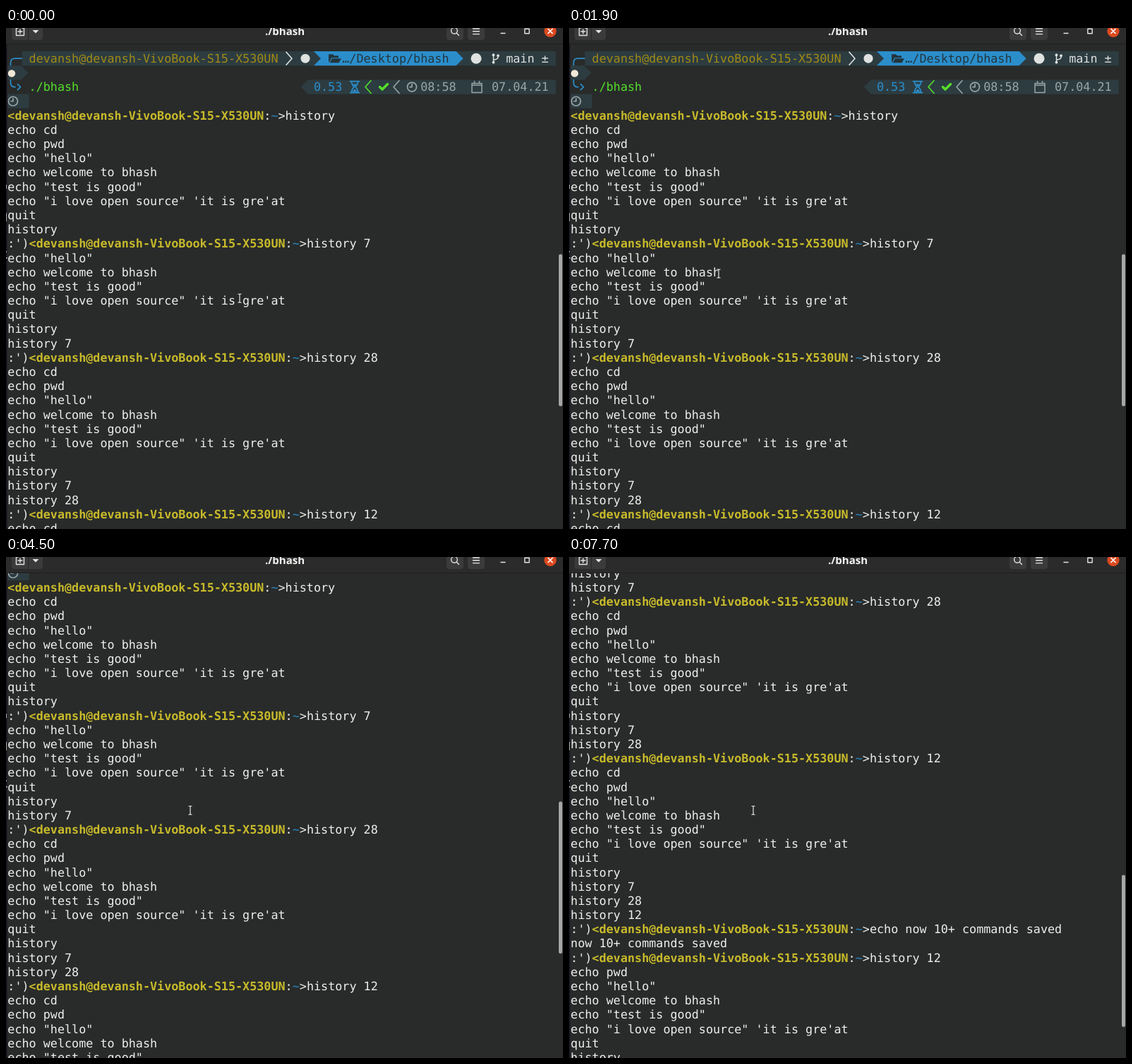
An HTML page that plays this animation: 789 by 710 pixels, repeating every 8 s.

```html
<!DOCTYPE html>
<html lang="en">
<head>
<meta charset="utf-8">
<title>Terminal history</title>
<style>
  html, body { margin: 0; width: 100%; height: 100%; overflow: hidden; background: #282b2a; }
  svg { display: block; width: 789px; height: 710px; }
  text { white-space: pre; text-rendering: geometricPrecision; }
  #rows text { font: 16.75px "DejaVu Sans Mono", "Liberation Mono", monospace; fill: #eeeeec; }
  #rows .user { font-weight: bold; fill: #c8ba2b; }
  #rows .tilde { fill: #2b86c6; }
  .line { fill: none; stroke-width: 1.7; stroke-linecap: round; stroke-linejoin: round; }
  .title { font: bold 15px "Noto Sans", "Open Sans", sans-serif; fill: #f2f2f0; }
</style>
</head>
<body>
<svg viewBox="0 0 789 710" xmlns="http://www.w3.org/2000/svg">
  <defs><clipPath id="view"><rect x="2" y="23" width="787" height="687"/></clipPath></defs>
  <rect width="789" height="710" fill="#282b2a"/>
  <g clip-path="url(#view)"><g id="rows"></g></g>

  <!-- sliver of the window behind -->
  <rect y="23" width="1.5" height="687" fill="#191420"/>
  <path d="M0 222h1v6h-1zM0 262h1v12h-1zM0 316h1v2h-1zM0 325h2v1.5h-2z" fill="#a9a9a9"/>

  <rect id="thumb" x="783" y="320.5" width="5" height="215.5" rx="2.5" fill="#a6a8a6"/>

  <g id="bar">
    <rect width="789" height="23" fill="#2b2b2b"/>
    <rect y="22" width="789" height="1" fill="#1f1f1f"/>
    <g fill="#3b3b3b">
      <rect x="8" y="-8" width="44" height="25" rx="4"/>
      <rect x="624" y="-8" width="24" height="25" rx="4"/>
      <rect x="654" y="-8" width="24" height="25" rx="4"/>
    </g>
    <path d="M31.5 0V17" stroke="#272727"/>
    <g class="line" stroke="#e4e4e2" style="stroke-width:1.4">
      <path d="M17 0H14.5V10.5H25.5V0H23M20 2V8M17 5H23"/>
      <circle cx="635" cy="3.8" r="4.4"/>
      <path d="M638.3 7.2L641.5 10.5M661.5 1H670.5M661.5 4.8H670.5M661.5 8.6H670.5"/>
      <path d="M701 7.5H707M734.8 1.2H741.2V7.8H734.8Z"/>
    </g>
    <path d="M37.5 3H46.5L42 7.5Z" fill="#e4e4e2"/>
    <circle cx="771" cy="4.5" r="8.6" fill="#db4a20"/>
    <path class="line" d="M768 1.5L774 7.5M774 1.5L768 7.5" stroke="#fff"/>
    <text class="title" x="395" y="10" text-anchor="middle">./bhash</text>
  </g>

  <g id="pointer" class="line">
    <path d="M-2.3 -6H-.8L0 -5.3L.8 -6H2.3M0 -5.3V5.3M-2.3 6H-.8L0 5.3L.8 6H2.3" stroke="#1b1c1c" stroke-width="2.4"/>
    <path d="M-2.3 -6H-.8L0 -5.3L.8 -6H2.3M0 -5.3V5.3M-2.3 6H-.8L0 5.3L.8 6H2.3" stroke="#f0f0f0" stroke-width="1.2"/>
  </g>
</svg>
<script>
const LOOP = 8000, PITCH = 20.18, CELL = 10.084, LEFT = 2.3, TOP = 43.2;
const USER = 'devansh@devansh-VivoBook-S15-X530UN';
const SLATE = '#2d3c41', BLUE = '#2b8ecb', GREY = '#9aa5a6', GREEN = '#55e02a', PALE = '#dfe2e0';
const $ = id => document.getElementById(id);
const rows = $('rows');

const col = n => LEFT + n * CELL;
const mid = n => TOP + n * PITCH;

function add(tag, attrs, parent = rows) {
  const el = document.createElementNS('http://www.w3.org/2000/svg', tag);
  for (const k in attrs) el.setAttribute(k, attrs[k]);
  parent.append(el);
  return el;
}
function write(row, c, parts, fill) {
  const el = add('text', { x: col(c), y: mid(row) + 5.8 });
  if (fill) el.style.fill = fill;
  for (const [str, cls] of parts) add('tspan', cls ? { class: cls } : {}, el).textContent = str;
}
const label = (row, c, str, fill) => write(row, c, [[str]], fill);
const stroke = (d, color, width = 1.7) =>
  add('path', { d, class: 'line', stroke: color, style: `stroke-width:${width}` });
const shape = (d, fill) => add('path', { d, fill });
const dot = (cx, cy, r, fill) => add('circle', { cx, cy, r, fill });

// Band from column a to b; head adds a pointed end: 1 right, -1 left.
function band(row, a, b, fill, head = 0) {
  const y = mid(row), t = y - PITCH / 2, e = y + PITCH / 2, l = col(a), r = col(b);
  const right = head > 0 ? `L${r + CELL} ${y}` : '';
  const left = head < 0 ? `L${l - CELL} ${y}` : '';
  shape(`M${l} ${t}H${r}${right}L${r} ${e}H${l}${left}Z`, fill);
}
function chevron(row, x, dir, color) {
  const y = mid(row);
  stroke(`M${x - 4 * dir} ${y - 9}L${x + 4 * dir} ${y}L${x - 4 * dir} ${y + 9}`, color, 1.6);
}
function clock(x, y) {
  stroke(`M${x - 6.5} ${y}a6.5 6.5 0 1 1 13 0a6.5 6.5 0 1 1 -13 0M${x} ${y - 4}V${y}H${x - 3}`, GREY);
}

function drawStatus() {
  const y0 = mid(0), y2 = mid(2);
  band(0, 2, 77, SLATE);
  band(0, 43, 63, BLUE, 1);
  band(0, 42, 43, SLATE, 1);
  stroke(`M6.5 ${y0 + 10}V${y0 + 6}Q6.5 ${y0} 12.5 ${y0}H22`, BLUE);
  label(0, 3, USER, '#a18b14');
  chevron(0, 401, 1, PALE);
  dot(424, y0, 6.5, PALE);
  shape(`M457 ${y0 + 5}V${y0 - 6}H463L465 ${y0 - 4}H471V${y0 - 1}H461L458 ${y0 + 5}ZM458.5 ${y0 + 6}L462 ${y0}H475L471.5 ${y0 + 6}Z`, '#23353d');
  label(0, 47, '…/Desktop/bhash', '#23353d');
  dot(666, y0, 7.5, PALE);
  stroke(`M690.5 ${y0 - 4}V${y0 + 4}M690.5 ${y0 + 2}Q697 ${y0 + 1} 697 ${y0 - 2}`, PALE, 1.5);
  for (const [x, y] of [[690.5, -5], [690.5, 5.5], [697, -4]]) dot(x, y0 + y, 1.9, PALE);
  label(0, 70, 'main ±', PALE);

  band(1, 0, 1.9, SLATE, 1);
  dot(8, mid(1) + 1, 5.2, '#f1e8d8');

  stroke(`M6.5 ${y2 - 10}V${y2 - 6}Q6.5 ${y2} 12 ${y2}H13M16.5 ${y2 - 4}L20.5 ${y2}L16.5 ${y2 + 4}`, BLUE);
  label(2, 3, './bhash', GREEN);
  band(2, 42.2, 77, SLATE, -1);
  label(2, 43, '0.53', BLUE);
  stroke(`M487.5 ${y2 - 8}H500.5M487.5 ${y2 + 8}H500.5M489.5 ${y2 - 8}Q489.5 ${y2 - 3} 493 ${y2}Q489.5 ${y2 + 3} 489.5 ${y2 + 8}M498.5 ${y2 - 8}Q498.5 ${y2 - 3} 495 ${y2}Q498.5 ${y2 + 3} 498.5 ${y2 + 8}`, BLUE);
  shape(`M490 ${y2 + 7}L494 ${y2 + 3}L498 ${y2 + 7}ZM491 ${y2 - 4}H497L494 ${y2}Z`, BLUE);
  chevron(2, 513, -1, GREEN);
  stroke(`M529.5 ${y2}L533 ${y2 + 3.5}L540.5 ${y2 - 4}`, GREEN, 3.4);
  chevron(2, 553, -1, GREY);
  clock(575, y2);
  label(2, 58, '08:58', GREY);
  stroke(`M660 ${y2 - 5}H674V${y2 + 8}H660ZM660 ${y2 - 2.5}H674M663.5 ${y2 - 8}V${y2 - 5}M670.5 ${y2 - 8}V${y2 - 5}`, GREY, 1.5);
  label(2, 68, '07.04.21', GREY);

  band(3, 0, 3, SLATE);
  clock(10, mid(3));
}

function drawSession() {
  const past = ['echo cd', 'echo pwd', 'echo "hello"', 'echo welcome to bhash',
    'echo "test is good"', 'echo "i love open source" \'it is gre\'at', 'quit'];
  let row = 4;
  const run = cmd => {
    write(row, 0, [[row > 4 ? ":')" : ''], ['<' + USER, 'user'], [':'], ['~', 'tilde'], ['>' + cmd]]);
    row++;
    past.push(cmd);
    const [name, ...args] = cmd.split(' ');
    const out = name === 'echo' ? [args.join(' ')] : past.slice(-(args[0] || past.length));
    for (const s of out) label(row++, 0, s);
  };
  ['history', 'history 7', 'history 28', 'history 12',
    'echo now 10+ commands saved', 'history 12'].forEach(run);
}

// [time, lines scrolled]
const scroll = [[0, 0], [3200, 4], [4800, 8], [4900, 12], [7700, 20]];
// [time, x, y]
const path = [
  [0, 331, 383], [300, 331, 381], [400, 331, 379],
  [600, 318, 372], [700, 289, 353], [800, 260, 336], [900, 249, 330],
  [1100, 205, 309], [1200, 154, 293], [1300, 133, 290], [1400, 127, 291],
  [1600, 109, 294], [1700, 128, 310], [1800, 177, 334], [1900, 212, 348],
  [2100, 226, 353], [2200, 244, 357], [2300, 257, 359], [2400, 261, 359],
  [2600, 261, 360], [2900, 262, 360], [3800, 261, 360], [4500, 261, 359]
];
const at = (steps, t) => steps.findLast(s => s[0] <= t);

function frame() {
  const t = performance.now() % LOOP;
  const lines = at(scroll, t)[1], [, x, y] = at(path, t);
  rows.setAttribute('transform', `translate(0 ${-lines * PITCH})`);
  $('thumb').setAttribute('y', 320.5 + lines * 6.5);
  $('pointer').setAttribute('transform', `translate(${x} ${y})`);
  requestAnimationFrame(frame);
}

drawStatus();
drawSession();
frame();
</script>
</body>
</html>
```
